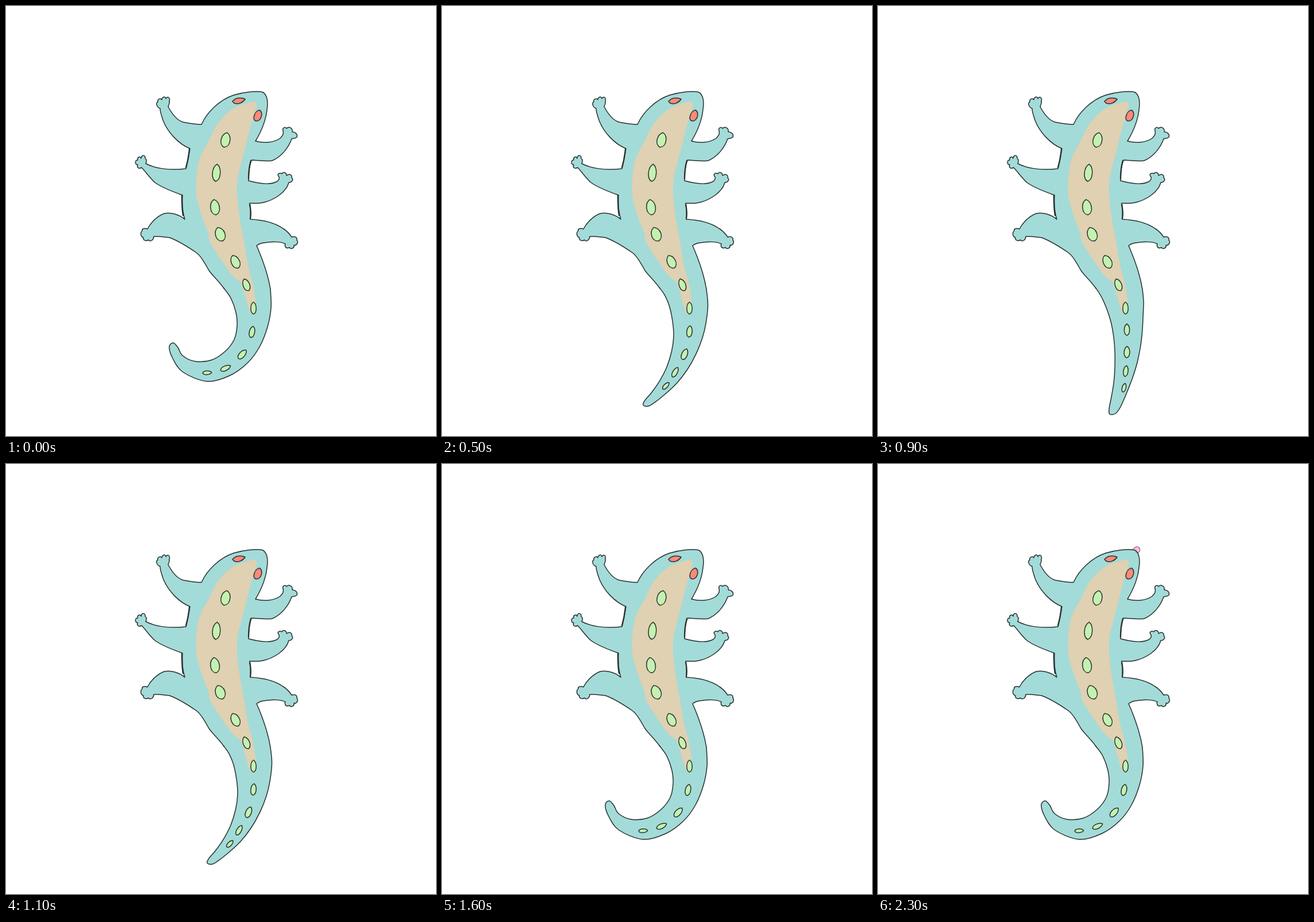
Write an HTML page that moves like this. It is 748 px wide and 748 px high and loops after 2.4 s.

```html
<!DOCTYPE html>
<html lang="en">
<head>
<meta charset="utf-8">
<title>Lizard</title>
<style>
html, body { margin: 0; width: 100%; height: 100%; overflow: hidden; background: #fff; }
svg { display: block; width: 100%; height: 100%; }
.skin { fill: #a3dbd8; }
.line { fill: none; stroke: #263030; stroke-width: 1.5; stroke-linecap: round; stroke-linejoin: round; }
.bold { stroke-width: 2.3; }
.belly { fill: #dfd1b1; }
.spot { fill: #c4f1b0; stroke: #263030; stroke-width: 1.5; stroke-linejoin: round; }
.eye { fill: #ff8878; stroke: #263030; stroke-width: 1.5; stroke-linejoin: round; }
#tongue path { fill: none; stroke-linecap: round; stroke: #6a5a62; stroke-width: 11.6; }
#tongue path + path { stroke: #f9bfd8; stroke-width: 9.6; }
</style>
</head>
<body>
<svg viewBox="0 0 748 748">
  <g id="tongue"><path/><path/></g>
  <path id="bodyFill" class="skin"/>
  <path id="tailFill" class="skin"/>
  <path id="belly" class="belly"/>
  <path id="bodyLine" class="line"/>
  <path id="tailLine" class="line"/>
  <path class="line bold" d="M319 249C318 260 316 271 313 281M306 330C306 342 306 354 308 364M426 269C423 279 422 290 422 301M424 345C426 354 426 362 425 370"/>
  <path class="eye" d="M394 166C398 160 409 158 416 162C412 168 404 172 397 169Z"/>
  <path class="eye" d="M441 181C446 184 446 192 441 198C436 202 431 200 431 194C432 187 436 182 441 181Z"/>
  <g id="spots"></g>
</svg>
<script>
const $ = id => document.getElementById(id);

// Outline pieces, clockwise from the left root of the tail to the right one.
const outline = [
  'M379 491C368 476 360 470 353 460C344 444 338 434 331 429',
  // left hind, middle and front legs
  'C315 418 298 408 285 403C275 402 264 400 257 401C257 407 251 411 248 407C243 410 238 407 239 403C234 401 233 394 237 391C236 387 242 386 246 388C251 378 262 366 275 361C288 358 303 364 311 371',
  'C307 358 306 343 307 329',
  'C290 323 270 315 259 307C248 297 243 288 236 281C231 284 227 281 229 276C224 276 224 268 229 268C228 262 234 261 235 265C236 258 243 259 242 265C246 268 244 271 243 274C256 281 280 287 313 283',
  'C316 272 318 260 320 248',
  'C300 240 282 220 274 201C270 190 268 182 268 178C262 176 260 168 264 167C263 161 270 160 271 163C272 157 278 157 278 161C281 156 286 159 284 166C285 170 283 172 282 175C290 190 298 199 308 202C318 204 330 206 340 206',
  // head
  'C350 184 372 163 396 155C412 150 436 147 447 150C455 155 456 168 454 180C452 200 443 220 434 235',
  // right front, middle and hind legs
  'C448 239 466 238 477 230C482 225 483 222 482 217C480 211 486 210 488 213C492 209 499 212 498 219C503 219 508 223 506 228C503 231 499 230 497 231C492 245 480 262 463 269C450 271 437 268 427 268',
  'C423 279 422 291 422 304',
  'C440 309 460 312 472 305C476 302 476 298 474 296C471 292 477 289 480 292C481 288 488 289 488 295C494 291 498 294 497 299C501 302 497 307 492 307C487 325 465 338 447 342C438 344 430 343 424 343',
  'C426 353 426 362 425 371',
  'C446 372 466 376 482 387C490 392 495 399 497 402C502 400 507 402 506 407C509 411 506 417 501 416C502 421 496 424 493 420C487 423 484 418 486 414C478 409 460 410 448 412C442 413 438 415 436 417',
  'C446 440 456 468 460 493'
].join('');

const belly = [
  433,166, 413,171, 390,182, 368,205, 352,236, 337,265, 331,300, 332,335, 342,370, 352,395,
  355,411, 371,437, 394,469, 408,481, 415,502, 423,529, 427,536, 432,533, 434,515, 430,485,
  422,455, 414,410, 406,365, 402,325, 403,300, 410,270, 418,240, 424,215, 433,185, 436,172, 433,166];

// Tail edge: inner side, tip, outer side.
const curled = [
  379,491, 391,508, 400,533, 402,556, 397,580, 381,601, 357,616, 328,618, 307,608,
  299,594, 291,586, 284,593,
  290,613, 308,637, 350,653, 389,643, 420,621, 441,593, 455,558, 461,525, 460,493];
const swept = [
  379,491, 388,503, 395,521, 397,545, 396,568, 387,594, 370,618, 347,639, 323,654,
  304,659, 297,666, 303,672,
  313,675, 342,670, 375,657, 403,638, 427,616, 446,590, 457,562, 463,525, 460,493];
const hanging = [
  379,491, 387,503, 396,522, 405,549, 410,576, 412,601, 412,630, 410,656, 406,680,
  402,701, 403,710, 413,709,
  422,697, 433,672, 443,646, 451,620, 457,590, 460,562, 461,541, 462,515, 460,493];

// x, y, tilt of the four tail spots in the same poses
const curledSpots = [428,567,12, 411,606,42, 382,630,65, 350,638,86];
const sweptSpots = [428,568,12, 411,606,42, 380,633,50, 351,649,72];
const hangingSpots = [433,563,0, 433,602,3, 431,635,8, 428,664,15];
const tailSpotSizes = [[10, 4.5], [10, 4.7], [9.5, 3.9], [7.8, 3.2]];

// x, y, tilt, half length, half width
const backSpots = [
  [382, 233, 12, 13, 7.5], [366, 290, 5, 15, 6.5], [363.5, 350, -8, 13.5, 7.5],
  [372.5, 397, -20, 12.5, 8], [399, 445, -25, 12, 7], [418, 485, -20, 11, 5.5], [430.5, 525.5, 0, 10.5, 4.5]];

function spline(p) {
  const n = p.length / 2;
  const at = (i, k) => p[2 * Math.max(0, Math.min(n - 1, i)) + k];
  const handle = (i, dir, k) => (at(i, k) + dir * (at(i + 1, k) - at(i - 1, k)) / 6).toFixed(2);
  let d = `M${p[0]} ${p[1]}`;
  for (let i = 0; i < n - 1; i++) {
    d += `C${handle(i, 1, 0)} ${handle(i, 1, 1)} ${handle(i + 1, -1, 0)} ${handle(i + 1, -1, 1)} ${at(i + 1, 0)} ${at(i + 1, 1)}`;
  }
  return d;
}

function addSpot(len, wid) {
  const el = document.createElementNS('http://www.w3.org/2000/svg', 'path');
  const x = wid * 1.38, top = -len * .6, low = len * .8;
  el.setAttribute('class', 'spot');
  el.setAttribute('d', `M0 ${-len}C${x} ${top} ${x} ${low} 0 ${len}C${-x} ${low} ${-x} ${top} 0 ${-len}Z`);
  return $('spots').appendChild(el);
}
const place = (el, x, y, tilt) => el.setAttribute('transform', `translate(${x} ${y}) rotate(${tilt})`);
const mix = (a, b, u) => a.map((v, i) => v + (b[i] - v) * u);

$('bodyFill').setAttribute('d', outline);
$('bodyLine').setAttribute('d', outline);
$('belly').setAttribute('d', spline(belly));
backSpots.forEach(([x, y, tilt, len, wid]) => place(addSpot(len, wid), x, y, tilt));
const tailSpots = tailSpotSizes.map(size => addSpot(...size));

// The swing follows an arc, so in-between poses bow outwards towards the tip.
function drawTail(pose) {
  const early = pose <= 3;
  const u = early ? pose / 3 : pose === 8 ? 1.15 : (pose - 3) / 4;
  const bow = Math.max(0, 4 * u * (1 - u));
  const dx = early ? -17 * bow : 0, dy = early ? 0 : 6 * bow;

  const edge = early ? mix(curled, swept, u) : mix(swept, hanging, u);
  const last = edge.length / 2 - 1;
  for (let i = 0; i <= last; i++) {
    const w = Math.sin(Math.PI * i / last) ** 2;
    edge[2 * i] += dx * w;
    edge[2 * i + 1] += dy * w;
  }
  const d = spline(edge);
  $('tailLine').setAttribute('d', d);
  $('tailFill').setAttribute('d', d + 'L445 465L385 465Z');

  const s = early ? mix(curledSpots, sweptSpots, u) : mix(sweptSpots, hangingSpots, u);
  tailSpots.forEach((el, i) => {
    const w = .1 + .2 * i;
    place(el, s[3 * i] + dx * w, s[3 * i + 1] + dy * w, s[3 * i + 2]);
  });
}

function drawTongue(size) {
  $('tongue').style.display = size ? '' : 'none';
  const d = `M445 154L${445.2 + 5.2 * size} ${153.2 - 4 * size}`;
  for (const el of $('tongue').children) el.setAttribute('d', d);
}

let shown = -1;
function frame() {
  const step = Math.floor(performance.now() / 100) % 24;
  if (step !== shown) {
    shown = step;
    drawTail(step <= 16 ? 8 - Math.abs(8 - step) : 0);
    drawTongue(step >= 19 ? 3 - Math.abs(21 - step) : 0);
  }
  requestAnimationFrame(frame);
}
frame();
</script>
</body>
</html>
```
